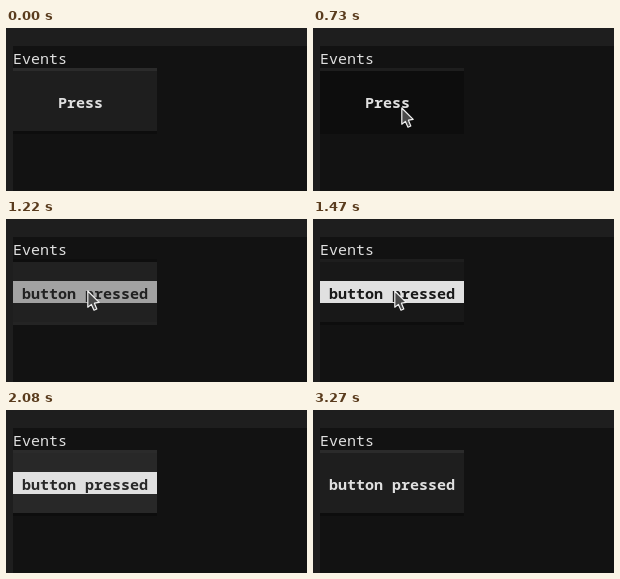
An HTML page that plays this animation: 301 by 163 pixels, repeating every 3.35 s.

```html
<!DOCTYPE html>
<html lang="en">
<head>
<meta charset="utf-8">
<title>Button events</title>
<style>
  html, body { margin: 0; width: 100%; height: 100%; overflow: hidden; background: #1e1e1e; }
  svg { display: block; width: 100vw; height: 100vh; }
  text { font: 15px "Noto Sans Mono", "DejaVu Sans Mono", monospace; fill: #e0e0e0; }
  #label { font-weight: 700; }
</style>
</head>
<body>
<svg viewBox="0 0 301 163">
  <rect width="301" height="163" fill="#1e1e1e"/>
  <rect x="7" y="18" width="294" height="145" fill="#121212"/>
  <text x="7" y="36">Events</text>
  <g shape-rendering="crispEdges">
    <rect id="face" x="7" y="40" width="144" height="66"/>
    <rect id="top" x="7" y="40" width="144" height="3"/>
    <rect id="bottom" x="7" y="103" width="144" height="3"/>
    <rect id="band" x="7" y="62" width="144" height="22"/>
  </g>
  <text id="label" y="80"></text>
  <circle id="ring" cx="82" cy="73" r="15" fill="#ff0" fill-opacity=".5"/>
  <path id="cursor" d="M.8 1V17.2L4.4 14.4L7 20.2L9.8 19L7.4 13.2L12.2 12.4Z"
    fill="#4a4a4a" stroke="#f2f2f2" stroke-width="1.2" stroke-linejoin="round"/>
</svg>
<script>
  const LOOP = 3350, TICK = 40, CELL = 9;
  const $ = id => document.getElementById(id);
  const [face, topEdge, bottomEdge, band, label, ring, cursor] =
    ["face", "top", "bottom", "band", "label", "ring", "cursor"].map($);

  // Button colours: face, top edge, bottom edge, text
  const STYLES = {
    normal:     ["#1e1e1e", "#2b2b2b", "#0d0d0d", "#e0e0e0"],
    hover:      ["#0d0d0d", "#1e1e1e", "#0d0d0d", "#e0e0e0"],
    focus:      ["#282828", "#2b2b2b", "#0d0d0d", "#e0e0e0"],
    hoverFocus: ["#181818", "#1e1e1e", "#0d0d0d", "#e0e0e0"],
    active:     ["#212121", "#0e0e0e", "#242424", "#a2a2a2"]
  };

  const within = (t, a, b) => t >= a && t < b;
  const ticks = (t, start) => Math.floor((t - start) / TICK);
  const show = (el, on) => el.setAttribute("visibility", on ? "visible" : "hidden");

  function styleAt(t) {
    if (t < 690 || t >= 3270) return "normal";
    if (t < 1140) return "hover";
    if (t < 1220) return "hoverFocus";
    if (t < 1470) return "active";
    return t < 1960 ? "hoverFocus" : "focus";
  }

  function cursorAt(t) {
    if (within(t, 450, 850)) {
      const rest = Math.pow(1 - ticks(t, 450) / 9, 1.5);
      return [81 + 66 * rest, 71 + 73 * rest];
    }
    if (within(t, 850, 1760)) return [81, 71];
    if (within(t, 1760, 2080)) {
      const u = (ticks(t, 1760) + 1) / 8;
      return [81 + 112 * Math.pow(u, 4.14), 71 + 87 * Math.pow(u, 2.34)];
    }
    if (within(t, 2700, 2780)) {
      const n = ticks(t, 2700);
      return [197 + 30 * n, 155 + 2 * n];
    }
    return null;
  }

  function render(t) {
    const [bg, upper, lower, ink] = STYLES[styleAt(t)];
    const reversed = within(t, 1140, 3270);
    const word = t < 1220 ? "Press" : "button pressed";

    face.setAttribute("fill", bg);
    topEdge.setAttribute("fill", upper);
    bottomEdge.setAttribute("fill", lower);
    band.setAttribute("fill", ink);
    show(band, reversed);

    if (label.textContent !== word) label.textContent = word;
    label.setAttribute("x", 7 + Math.floor((16 - word.length) / 2) * CELL);
    label.style.fill = reversed ? bg : ink;

    show(ring, within(t, 1100, 1220));
    const at = cursorAt(t);
    show(cursor, at);
    if (at) cursor.setAttribute("transform", `translate(${at.map(Math.round)})`);
  }

  const start = performance.now();
  function frame() {
    render((performance.now() - start) % LOOP);
    requestAnimationFrame(frame);
  }
  frame();
</script>
</body>
</html>
```
